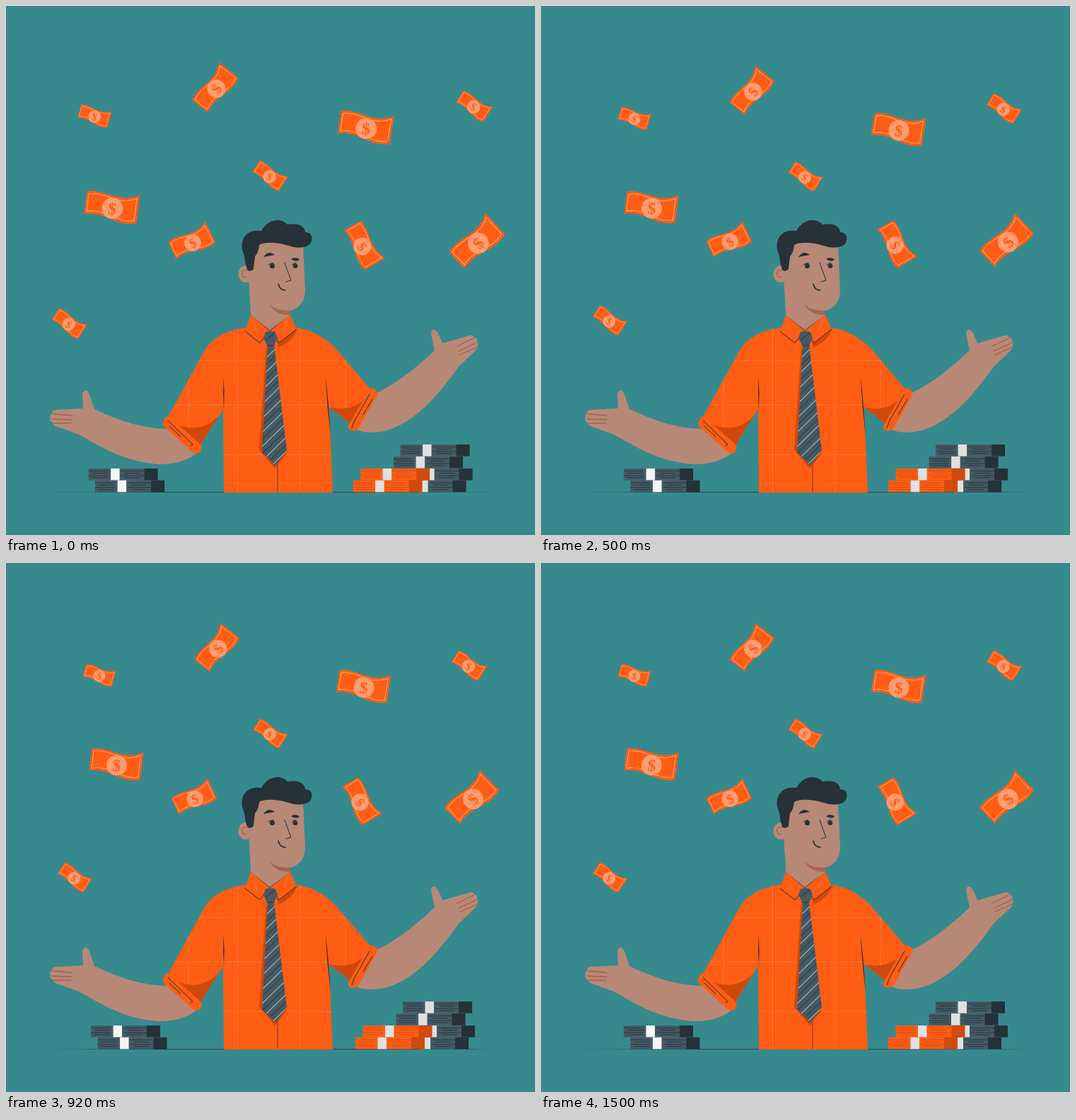
Write an HTML page that moves like this. It is 748 px wide and 748 px high and loops after 1.54 s.

```html
<!DOCTYPE html>
<html lang="en">
<head>
<meta charset="utf-8">
<title>Money rain</title>
<style>
  html, body { margin: 0; width: 100%; height: 100%; overflow: hidden; background: #368a8e; }
  svg { display: block; width: 100vw; height: 100vh; }
  .orange { fill: #ff5d14; }
  .shade { fill: #cf490c; }
  .skin { fill: #b78876; }
  .dark { fill: #263238; }
  .slate { fill: #455a64; }
  .ink, .check, .crease, .edge { fill: none; stroke: #263238; stroke-width: 1; stroke-linecap: round; }
  .check { stroke: #ff9c70; stroke-width: .8; opacity: .55; }
  .crease { stroke: #a5604c; stroke-width: 1.3; }
  .edge { stroke: #ffb390; stroke-width: .9; }
  .sign { font: bold 23px "Liberation Serif", serif; text-anchor: middle; fill: #ff5d14; }
</style>
</head>
<body>
<svg viewBox="0 0 748 748">
  <defs>
    <clipPath id="tieShape"><path d="M370 479H379L397 628 381 650 362 631Z"/></clipPath>
    <clipPath id="shirtShape"><path d="M343 454C308 459 289 470 277 494L228 583 274 622 307 570 308 688H462L457 567 486 590 517 544 466 484C448 466 430 457 405 454Z"/></clipPath>
    <g id="bill">
      <path class="orange" d="M-35-23C-10-27 8-5 38-18L33 21C5 26-9 4-39 8Z"/>
      <path class="edge" d="M-32-19.5C-9-23 9-2 34-13.5L30 17.5C6 21-9 0-35 4.5Z"/>
      <circle r="14.5" cy=".5" fill="#ff9c70"/>
      <text class="sign" y="8.5" transform="rotate(4)">$</text>
    </g>
  </defs>

  <path class="dark" opacity=".75" d="M36 687.5Q374 686.5 712 687.5 374 688.5 36 687.5Z"/>

  <!-- forearms -->
  <path class="skin" d="M230 598C195 598 160 587 125 570L118 549Q113 539 108 548L109 569 70 571Q64 572 66 576 61 578 63 583 61 587 66 589 67 594 73 595L103 606C130 620 160 643 215 648 240 649 262 641 274 628Z"/>
  <path class="crease" d="M67 577L93 579M65 584L93 585M68 590L92 590"/>
  <path class="skin" d="M520 549C558 532 590 502 606 487L601 463Q602 456 607 458 612 462 617 477L655 466Q661 464 662 469 667 469 666 474 669 477 666 482 667 485 661 490L640 510C610 552 568 604 515 603Q503 603 494 598Z"/>
  <path class="crease" d="M661 470L638 481M666 476L640 488M665 483L642 493"/>

  <!-- shirt -->
  <g clip-path="url(#shirtShape)">
    <path class="orange" d="M200 440H540V690H200Z"/>
    <path class="check" d="M270 501.5H490M235 564H457M308 634.5H462M327.500 450V687M416 450V687M258 520V620M480 490V590"/>
    <path class="shade" d="M229 582C250 603 287 603 308 570L274 624ZM457 567C482 573 502 567 517 542L487 592Z"/>
  </g>
  <path class="dark" d="M307.5 525Q309.500 548 308 571 306.500 548 307.500 525ZM451.500 523Q456.500 562 459 608 454 566 451.500 523Z"/>
  <path class="ink" d="M384 646V687" opacity=".7"/>
  <path class="orange" d="M231 581Q226 579 223 586 220 592 225 596L263 630Q269 636 275 630 279 624 274 619Z"/>
  <path class="ink" d="M229 586L264 620 261 622M231 594L247 609"/>
  <path class="orange" d="M513 543Q517 538 523 543 527 547 524 552L499 596Q494 603 487 600 481 596 486 590Z"/>
  <path class="ink" d="M514 549L492 588 489 597M518 556L505 578"/>

  <!-- head -->
  <ellipse class="skin" cx="338.500" cy="379" rx="10" ry="12"/>
  <path class="crease" d="M340 374Q333 372 334 380 336 385 340 383"/>
  <path class="skin" d="M342 365L346.500 440 373 460 402 440 401 431C415 428 423 417 423 402L420 338 365 325 346 350Z"/>
  <path d="M373 422C380 429 390 431 402 430.500L401 437C389 437 378 433 373 422Z" fill="#a9664f"/>
  <path class="dark" d="M341 373Q345 377 350 372L352 354Q357 349 358 338C365 333 385 334 400 339 415 344 427 341 431 335 435 326 431 320 423 320 423 311 412 306 398 309 389 299 371 300 361 318 345 315 331 325 334 345Q338 354 338 362Z"/>
  <path class="dark" d="M364 355Q371 345 380 352 374 353 364 355ZM403 358Q408 354 415 358 412 363 403 358Z"/>
  <g class="dark"><circle cx="376.500" cy="367.500" r="3.500"/><circle cx="409" cy="367.500" r="3.300"/></g>
  <path class="ink" d="M371 366Q374 363 378 363.500M404 366Q406 363 410 363.500"/>
  <path class="ink" d="M394 363L403 388 396 390"/>
  <path class="ink" style="stroke-width:1.7" d="M385 393Q387 402 395 402"/>

  <!-- collar and tie -->
  <path class="shade" d="M383 474L411 457Q407 473 385 483ZM368 478L358 628 380 654 396 634Z"/>
  <path class="orange" d="M346 437L373 459 359 477 338 460ZM402 437L411 457 386 477 373 459Z"/>
  <path class="ink" d="M338 460L359 476.500 370 462M376 461L386 476.500 411 457"/>
  <path class="check" d="M349 448L355 461M399 444L393 458"/>
  <path class="dark" d="M346 437L373 458 402 437 373 460Z" opacity=".5"/>
  <path class="slate" d="M367 461Q374 458 381 461L384 469 379 480H369L364 469Z"/>
  <path class="slate" d="M370 479H379L397 628 381 650 362 631Z"/>
  <g id="stripes" clip-path="url(#tieShape)"></g>
  <path class="ink" d="M370 480H379M368 472L379 463"/>

  <g id="stacks"></g>
  <g id="bills"></g>
</svg>
<script>
const $ = id => document.getElementById(id);

// x, y, scale, rotation
const bills = [
  [132, 159.5, .59, 9], [299.5, 121, .87, -59], [506, 175.5, 1, 1.5], [654, 146, .63, 25],
  [373, 242, .615, 25], [156.5, 285.5, 1, 0], [267, 333, .8, -33], [501, 338, .84, 52],
  [660, 333.5, 1, -51], [96.5, 445.5, .615, 26]
];
$('bills').innerHTML = bills.map(([x, y, s, r]) =>
  `<use href="#bill" transform="translate(${x} ${y}) rotate(${r}) scale(${s})"/>`).join('');

let stripes = '';
for (let y = 496; y < 680; y += 20) {
  stripes += `<path d="M355 ${y + 14}L400 ${y - 30}" stroke="#dfe5e7"/>
    <path d="M355 ${y + 24}L400 ${y - 20}" stroke="#263238"/>`;
}
$('stripes').innerHTML = stripes;

const slate = ['#455a64', '#263238'], orange = ['#ff5d14', '#d14a0e'];
const bar = (x, y, w, fill) => `<rect x="${x}" y="${y}" width="${w}" height="16.6" fill="${fill}"/>`;

function bundle(x, y, [main, end], band) {
  const grooves = [3.5, 6.5, 10, 13].map((dy, i) =>
    `M${x + i % 2 * 4} ${y + dy}H${x + 28}M${x + 46 + i % 2 * 5} ${y + dy}H${x + 79 - i % 2 * 6}`).join('');
  return bar(x, y, 80, main) + bar(x + 79, y, 19, end) +
    `<path d="${grooves}" stroke="${end}" stroke-width=".8"/>` + bar(x + 31.5, y, 12.5, band);
}

$('stacks').innerHTML = [
  [117, 654, slate, '#f5f5f5'], [126.5, 670.7, slate, '#f5f5f5'],
  [558, 620, slate, '#e0e0e0'], [548.5, 637, slate, '#e0e0e0'],
  [562, 654, slate, '#e0e0e0'], [553, 670.7, slate, '#e0e0e0'],
  [501.5, 654, orange, '#e0e0e0'], [491, 670.7, orange, '#e0e0e0']
].map(args => bundle(...args)).join('');

// Linear interpolation through [percent, value] keys
function track(keys, p) {
  const i = keys.findIndex(key => key[0] > p);
  const [p0, v0] = keys[i - 1], [p1, v1] = keys[i];
  return v0 + (v1 - v0) * (p - p0) / (p1 - p0);
}

const beat = [[0, 1], [10, 1.1], [30, 1], [40, 1], [50, 1.1], [60, 1], [100, 1]];
const shake = [0, -1, 2, -4, 4, -4, 4, -4, 2, -1, 0].map((v, i) => [i * 10, v * 1.35]);
const LOOP = 1540, STEPS = 37, FPS = 24;

function draw(now) {
  const step = Math.floor((now % LOOP + 4) * FPS / 1000);
  const percent = (step + 1) % STEPS / STEPS * 100;
  $('bills').setAttribute('transform',
    `translate(384.5 277) scale(${track(beat, percent)}) translate(-384.5 -277)`);
  $('stacks').setAttribute('transform', `translate(${track(shake, percent)} 0)`);
}

const start = performance.now();
function tick() {
  draw(performance.now() - start);
  requestAnimationFrame(tick);
}
tick();
</script>
</body>
</html>
```
